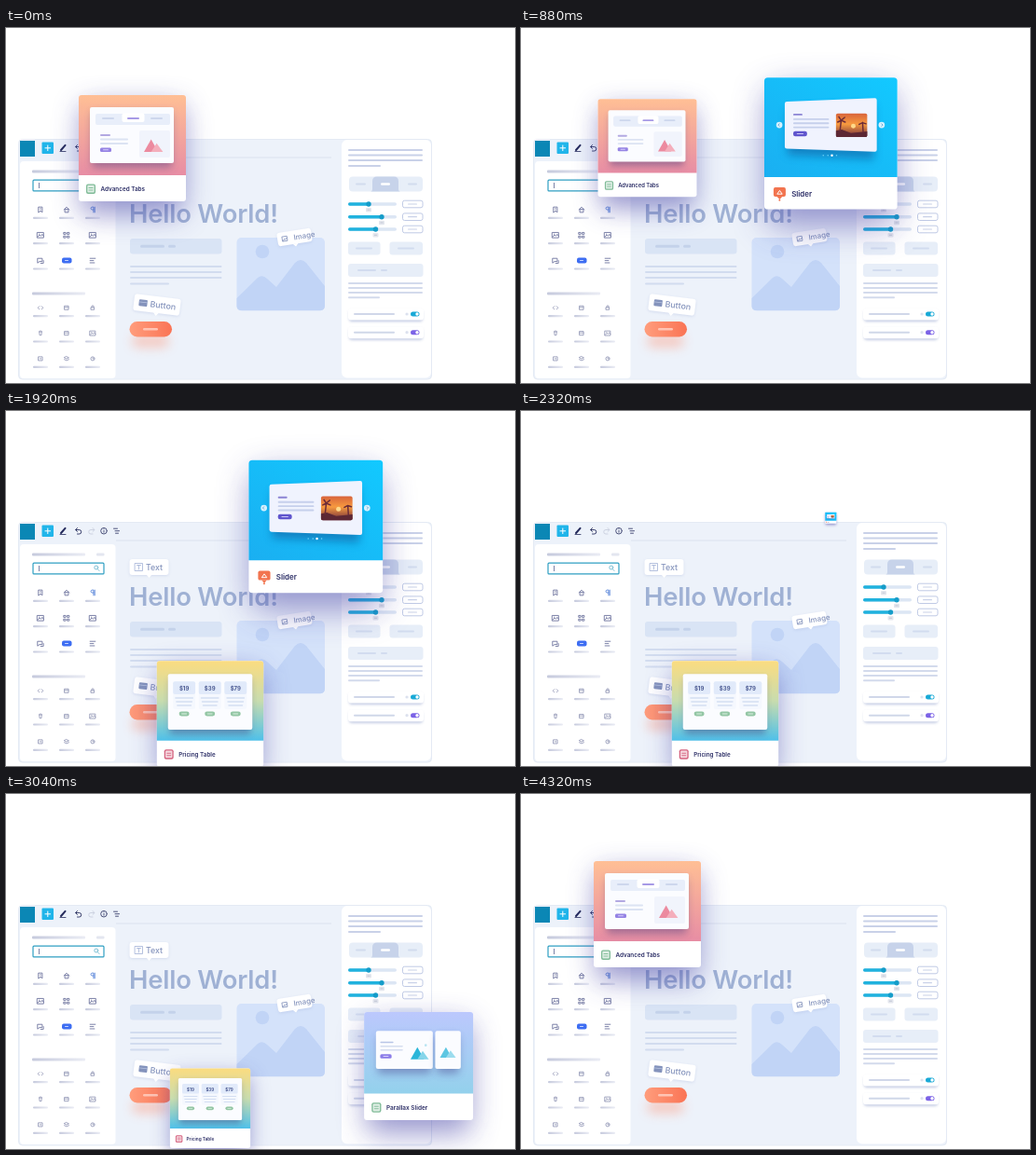
An HTML page that plays this animation: 546 by 381 pixels, repeating every 4800 ms.

```html
<!DOCTYPE html>
<html lang="en">
<head>
<meta charset="utf-8">
<title>Page builder blocks</title>
<style>
html, body { margin: 0; width: 100%; height: 100%; overflow: hidden; background: #fff }
svg { display: block; font-family: Inter, "Open Sans", sans-serif }
</style>
</head>
<body>
<svg id="stage" width="546" height="381" viewBox="0 0 546 381"></svg>
<script>
const rect = (x, y, w, h, fill, r = 0, more = '') =>
  `<rect x="${x}" y="${y}" width="${w}" height="${h}" rx="${r}" fill="${fill}" ${more}/>`;
const bar = (x1, x2, y, fill = '#d2dcef', h = 2) => rect(x1, y - h / 2, x2 - x1, h, fill, h / 2);
const disc = (x, y, r, fill, more = '') => `<circle cx="${x}" cy="${y}" r="${r}" fill="${fill}" ${more}/>`;
const shape = (d, fill, more = '') => `<path d="${d}" fill="${fill}" ${more}/>`;
const line = (d, color, w = 1) =>
  shape(d, 'none', `stroke="${color}" stroke-width="${w}" stroke-linecap="round" stroke-linejoin="round"`);
const text = (x, y, size, fill, str, weight = 600, more = '') =>
  `<text x="${x}" y="${y}" font-size="${size}" font-weight="${weight}" fill="${fill}" ${more}>${str}</text>`;
const at = (x, y, body, more = '') => `<g transform="translate(${x} ${y}) ${more}">${body}</g>`;
const fade = (id, a, b, dir = 'x2="0" y2="1"', mid = '') =>
  `<linearGradient id="${id}" ${dir}><stop stop-color="${a}"/>${mid}<stop offset="1" stop-color="${b}"/></linearGradient>`;
const blur = (id, s) =>
  `<filter id="${id}" x="-100%" y="-100%" width="300%" height="300%"><feGaussianBlur stdDeviation="${s}"/></filter>`;

const defs = '<defs>' +
  fade('tabs', '#ffbf95', '#e78da4') +
  fade('slider', '#1aaff1', '#12c9ff', 'x1="0" y1="1" x2="1" y2="0"') +
  fade('pricing', '#fbdc80', '#4fc0e9', undefined, '<stop offset=".5" stop-color="#c8dcae"/>') +
  fade('parallax', '#bcc8fd', '#93d1ec') +
  fade('sunset', '#d8643c', '#6f2c3c', undefined, '<stop offset=".45" stop-color="#f79a3f"/>') +
  fade('orange', '#ff9d7c', '#fa7455', '') +
  fade('label', '#c6cadd', '#eaecf4', '') +
  blur('wide', 15) + blur('mid', 4) + blur('glow', 6) + blur('soft', 1.5) + '</defs>';

// Toolbar and left panel
function toolbar() {
  const ink = '#252b5c';
  return rect(15, 121, 16, 17, '#0b87b5') +
    rect(38.5, 122.5, 12.5, 12.5, '#21b5ea', 1) + line('M44.8 126v5.6M42 128.8h5.6', '#fff') +
    line('M59 131l4.5-5.2', ink, 2) + line('M58 132.5h6', ink, .8) +
    line('M76.5 125.5l-2 2 2 2M75 127.5h3.5a2.2 2.2 0 010 4.5h-2', ink, .9) +
    line('M93 125.5l2 2-2 2M94.5 127.5h-3.5a2.2 2.2 0 000 4.5h2', '#c9cede', .9) +
    line('M108.3 128.7a3.3 3.3 0 11-6.6 0a3.3 3.3 0 116.6 0M105 128.5v1.7M105 126.9v.1', ink, .8) +
    line('M115.5 126.2h4M117 128.7h4.500M117.5 131.2h3', ink, .8) +
    rect(118, 138.5, 231, 1, '#dce3f0');
}

const picture = 'M-3.5-3h7v6h-7zM-3 2l2-2.5 1.5 1.5 1.5-2 1.5 2M-1.5-1.3v.1';
const lines = 'M-3-2.5h6M-3 0h4M-3 2.5h5';
const card = 'M-2.5-2.5h5v5h-5zM-2.5-.5h5';
const icons = [
  'M-2-3h4v6l-2-1.8-2 1.8zM-.5-1h1', 'M-3 0l3-3 3 3M-2 0v3h4v-3z', 'M1 3v-6h-1.5a1.5 1.5 0 000 3h1.5M2.3-3v6',
  picture, 'M-3-3h2v2h-2zM1-3h2v2h-2zM-3 1h2v2h-2zM1 1h2v2h-2z', picture,
  'M-3-2.5h5v3.5h-3l-2 1.5zM3.3 0v3h-3', '', lines,
  'M-1.5-2l-2 2 2 2M1.5-2l2 2-2 2', card, 'M-2-.5h4v3h-4zM-1.3-.5v-1.2a1.3 1.3 0 012.6 0v1.2',
  'M-2-2h4M-1.5-2l.3 4.5h2.4l.3-4.5M-.5-3h1', card, picture,
  'M-2.5-2.5h5v5h-5zM-1 0h2', 'M0-2.8l3 1.5-3 1.5-3-1.5zM-3 1l3 1.5 3-1.5', 'M2.5 0a2.5 2.5 0 11-5 0a2.5 2.5 0 115 0M0-1v1h1'
];

function leftPanel() {
  let s = rect(15, 143, 102.5, 233, '#fff', 4) +
    rect(28, 152.5, 57, 3, 'url(#label)', 1) + rect(97, 152.5, 8.5, 3, '#e3e6f0', 1) +
    rect(29, 163.2, 76, 11.7, '#fff', 1, 'stroke="#2f9fc2" stroke-width="1.2"') +
    rect(35, 166, .8, 6, '#596391') +
    line('M98.8 168a2 2 0 11-4 0a2 2 0 114 0M98.4 169.8l1.6 1.7', '#5fafca', .8) +
    rect(28, 283.5, 57, 3, 'url(#label)', 1);
  icons.forEach((d, i) => {
    const x = 37 + i % 3 * 28, row = i / 3 | 0;
    const y = (row < 3 ? 195 : 218.4) + row * 27.3;
    s += d ? at(x, y, line(d, i == 2 ? '#5583d8' : row < 3 ? '#777ca4' : '#8f93b4'), `scale(${row < 3 ? .95 : .82})`)
           : rect(x - 5, y - 3, 10.5, 6, '#3d6df2', 2) + bar(x - 2, x + 2, y, '#c7d6ff', 1);
    s += rect(x - 8, y + 7.8, 16, 2.2, 'url(#label)', 1);
  });
  return s;
}

// Page canvas
function tag(x, y, w, h, turn, str, icon, size) {
  const c = '#8493bc';
  return at(x, y,
    rect(-w / 2, -h / 2 + 1, w, h, '#8799cc', 3, 'opacity=".25" filter="url(#soft)"') +
    rect(-w / 2, -h / 2, w, h, '#fff', 3) + shape(`M-3 ${h / 2 - .5}h6l-3 3.5z`, '#fff') +
    at(-w / 2 + 10, 0, icon(c)) + text(-w / 2 + 17.5, size * .36, size, c, str, 500), `rotate(${turn})`);
}

function page() {
  const hill = '#c1d4f6';
  return tag(153.5, 167.5, 42, 17, 0, 'Text', c => line('M-4-4h8v8h-8zM-2-2h4M0-2v4.5', '#a3b2d6', .8), 8.8) +
    text(132, 209.2, 27.4, '#9fb1d4', 'Hello World!', 600, 'letter-spacing="-.2"') +
    rect(133, 226, 98.5, 16.5, '#d9e4f5', 3) + bar(144, 170, 234.3, '#c4d2ea', 3) + bar(174, 182, 234.3, '#c4d2ea', 3) +
    bar(133, 231.5, 256) + bar(133, 231.5, 262) + bar(133, 231.5, 268) + bar(133, 175, 274.5) +
    rect(247.5, 225, 94.5, 78.5, '#d4e2fa', 5) + disc(275, 240, 7.3, hill) +
    shape('M247.5 290L270 268q5-4 10 1l10 9 20-26q6-6 12 0l20 25v21q0 5-5 5h-85q-4.5 0-4.5-5z', hill) +
    tag(309.5, 224.5, 37, 14.5, -9, 'Image', c => at(-2, 0, line('M-2.5-2.5h5v5h-5zM-2 2l1.5-2 1 1 1.5-1.5', c, .8)), 7.9) +
    tag(162, 297, 50, 18, 7, 'Button', c => rect(-4.5, -3.5, 9, 7, c, 1) + rect(-4.5, -1.2, 9, .8, '#b9c5e2'), 8.9) +
    rect(135, 329, 40, 14, '#ff8b69', 7, 'opacity=".38" filter="url(#glow)"') +
    rect(132.5, 315, 45.5, 16.5, 'url(#orange)', 8.2) + bar(147, 163, 323.2, '#ffc4b3', 2.5);
}

// Settings panel
function rightPanel() {
  const dim = '#c9d1e8', pale = '#e7eef8', blue = '#20b2de';
  let s = rect(360, 120, 96, 255.5, '#fff', 6);
  [131, 136.5, 142].forEach(y => s += bar(367, 447, y, dim));
  s += bar(367, 402, 148, dim) +
    rect(368, 159.5, 79, 16, pale, 4) + shape('M391 175.5q2 0 2-3v-8q0-5 5-5h18q5 0 5 5v8q0 3 2 3z', '#c7d3ea') +
    bar(375, 386, 167.5, '#d2dcee') + bar(402, 412, 167.5, '#fff', 2.5) + bar(431, 441, 167.5, '#d2dcee');
  [[189, 389], [202.7, 403], [216, 396.5]].forEach(([y, x]) => {
    s += bar(367, 419, y, '#dce6f4', 3.5) + bar(367, x, y, blue, 3.5) +
      rect(x - 3, y + 4, 6, 4.5, '#e3e6ed', 1) + rect(x - 1.5, y + 5.7, 3, 1, '#c3c8d6') +
      disc(x, y, 2.7, '#159cc9') +
      rect(425.5, y - 3.8, 21.5, 7.6, '#fff', 2, 'stroke="#b9c5e2" stroke-width=".9"') + bar(431, 441, y, dim, 1.2);
  });
  s += rect(367, 229.5, 34.5, 14, pale, 3) + bar(375, 393, 236.5) +
    rect(411.5, 229.5, 35.5, 14, pale, 3) + bar(420, 438, 236.5) +
    rect(367, 253, 80.5, 14, pale, 3) + bar(377, 397, 260) + bar(402, 409, 260);
  [274, 279, 284].forEach(y => s += bar(367, 447, y, '#d3daec'));
  s += bar(367, 401, 289.3, '#d3daec');
  [[307, '#18a9d6'], [326.7, '#7b62e6']].forEach(([y, c]) => {
    s += rect(368, y - 4, 79, 12, '#5f74b5', 3, 'opacity=".4" filter="url(#soft)"') +
      rect(367, y - 6, 81, 12.5, '#fff', 3) + bar(373, 417, y, '#d0d7e9') +
      disc(430, y, 1.6, '#dce1ee') + rect(434, y - 2.5, 9.5, 5, c, 2.5) + disc(441, y, 1.7, '#fff');
  });
  return s;
}

// Card artwork, drawn in a 115 x 114 box
const panel = (x, y, w, h) =>
  rect(x + 2, y + 5, w - 4, h, '#3a3580', 2, 'opacity=".4" filter="url(#mid)"') + rect(x, y, w, h, '#fbfcff', 2);
const peaks = (x, y, k, a, b) => at(x, y,
  shape('M0 16L9 0l9 16z', a) + shape('M9 16l7-11 8 11z', b), `scale(${k})`);

const art = {
  tabs: () => panel(12, 13, 90, 60) + rect(18, 20, 80, 12, '#e8eefa', 2) +
    rect(46.5, 19.5, 24, 9.5, '#fff', 2) + bar(25, 38, 25, '#cdd7ed') + bar(52, 65, 25, '#a79ae6') + bar(77, 90, 25, '#cdd7ed') +
    bar(23, 34, 43, '#b3a9e2') + bar(23, 53, 47.5, '#dce3f3') + bar(23, 53, 52, '#dce3f3') +
    rect(23, 56.5, 12, 4.5, '#9583e4', 1.5) + bar(26, 32, 58.7, '#d7cffa', 1) +
    rect(65, 38, 33, 29, '#f1f4fc', 2) + peaks(70, 47.5, .85, '#ec8a9f', '#f4aebb'),
  slider: () => shape('M20 27l75-3v47l-75-4z', '#0b4f92', 'opacity=".5" filter="url(#mid)"') +
    shape('M19.5 20.8L95.5 17.800q1.8-.1 1.8 1.7v43q0 1.8-1.8 1.7L19.5 61.500q-1.8-.1-1.8-1.7v-37.300q0-1.6 1.8-1.7z', '#f0f3fe') +
    bar(25, 33, 32, '#8b84d4', 1.5) + [36, 39.5, 43].map(y => bar(25, 56, y, '#c6d0ec', 1.5)).join('') +
    rect(25, 46.3, 12, 4.5, '#5f55cd', 1.8) + bar(28, 34, 48.5, '#c9c4f7', .8) +
    rect(62, 31, 27, 20.5, 'url(#sunset)', 1.5) + disc(77, 42, 2, '#ffd98a') +
    shape('M62 46l5-1 8 3 14-1.500v3.500q0 1.500-1.500 1.500h-24q-1.500 0-1.500-1.500z', '#5c2734') +
    line('M65.500 46l1-9M66.500 37l-3 1.500M66.500 37l3.500 1.500M66.500 37l-2-3M66.500 37l3-2.500M85.500 47l-.5-8M85 39l-3 1.500M85 39l3 1', '#6b2b37', 1.2) +
    [[13, 'l-1 1 1 1'], [101.5, 'l1 1-1 1']].map(([x, d]) => disc(x, 41, 2.7, '#d5f1fe') + line(`M${x} 40${d}`, '#4c8fc4', .6)).join('') +
    [51, 55, 58.5, 62.5].map((x, i) => disc(x, 67.3, i == 2 ? 1 : .6, i == 2 ? '#fff' : '#6fd6f9')).join(''),
  pricing: () => panel(12, 14, 91, 60) + ['$19', '$39', '$79'].map((price, i) => {
    const x = 29.5 + i * 27.7;
    return rect(x - 12, 22, 24, 30, '#f5f8fe', 2) + rect(x - 12, 22, 24, 14, '#e1eafa', 2) +
      text(x, 32, 6, '#47568f', price, 700, 'text-anchor="middle"') +
      [40, 44, 48].map((y, j) => bar(x - 10 + j, x + 10 - j, y, '#d3def2', 1.5)).join('') +
      rect(x - 5.5, 54.5, 11, 5, '#93c6a4', 2.5) + bar(x - 3, x + 3, 57, '#dcefe2', 1);
  }).join(''),
  parallax: () => panel(12.5, 20, 60, 40) + panel(75, 20, 27, 40) +
    bar(17, 31, 32, '#b8c5e6', 1.5) + bar(17, 41, 36, '#d5ddef', 1.5) + bar(17, 41, 40, '#d5ddef', 1.5) +
    rect(17, 44.5, 12, 4.5, '#8b7ce8', 1.5) + bar(20, 26, 46.7, '#d9d2fa', .8) +
    peaks(49, 37, .8, '#2bb6d9', '#86d5ea') + peaks(80, 37, .7, '#5cc6e2', '#9bdcee') + disc(65, 35, 1.3, '#b9e4f2')
};

const boxIcon = c => rect(8, 95.5, 10, 10.5, c, 2) + rect(9.3, 96.800, 7.400, 7.800, '#fff', 1, 'opacity=".75"') +
  line('M11 99.5h4M11 102h4', c, .9);
const pinIcon = c => rect(8, 95, 10.5, 8, c, 1.5) + shape('M11 103h4.5l-2.2 2.5z', c) +
  line('M11.3 100.5l2-2.8 2 2.8z', '#fff', .8) + disc(13.2, 106, .8, c);

// in / out: start times in ms; drop: how far the centre moves as the card shrinks
const cards = [
  { id: 'tabs', name: 'Advanced Tabs', x: 135.5, y: 129, size: 1, drop: -4, in: 3844, out: 850, icon: boxIcon('#7fbb97') },
  { id: 'slider', name: 'Slider', x: 332.3, y: 124, size: 1.25, drop: -10, in: 501, out: 1970, icon: pinIcon('#f2744f') },
  { id: 'pricing', name: 'Pricing Table', x: 219, y: 325, size: .995, drop: 50, in: 1446, out: 2946, icon: boxIcon('#d5627f') },
  { id: 'parallax', name: 'Parallax Slider', x: 442.6, y: 292, size: 1.017, drop: 22, in: 2322, out: 3890, icon: boxIcon('#7fbb97') }
];

const drawCard = c => `<g id="${c.id}-card">` +
  rect(-55, -46, 110, 117, '#4543a6', 8, 'opacity=".55" filter="url(#wide)"') +
  at(-57.5, -57, rect(0, 0, 115, 114, '#fff', 3) +
    shape('M0 86V3q0-3 3-3h109q3 0 3 3v83z', `url(#${c.id})`) + art[c.id]() +
    c.icon + text(23.5, 102.8, 6.35, '#2c2e66', c.name)) + '</g>';

document.getElementById('stage').innerHTML = defs +
  rect(13.5, 119.5, 443, 257.5, '#edf2fa', 4, 'stroke="#e4eaf4"') +
  toolbar() + leftPanel() + page() + rightPanel() + cards.map(drawCard).join('');
for (const c of cards) c.node = document.getElementById(c.id + '-card');

const LOOP = 4800, STEP = 80, SPAN = 382;
const since = (t, start) => (t - start + LOOP) % LOOP;

function scaleAt(c, t) {
  const life = since(c.out, c.in), age = since(t, c.in);
  if (age < life) return Math.min(1, age / SPAN);
  return Math.max(0, 1 - (age - life) / SPAN);
}

function draw() {
  const t = Math.floor(performance.now() % LOOP / STEP) * STEP;
  for (const c of cards) {
    const s = scaleAt(c, t);
    c.node.style.display = s > .01 ? '' : 'none';
    c.node.setAttribute('transform', `translate(${c.x} ${c.y + c.drop * (1 - s)}) scale(${s * c.size})`);
  }
  requestAnimationFrame(draw);
}
draw();
</script>
</body>
</html>
```
